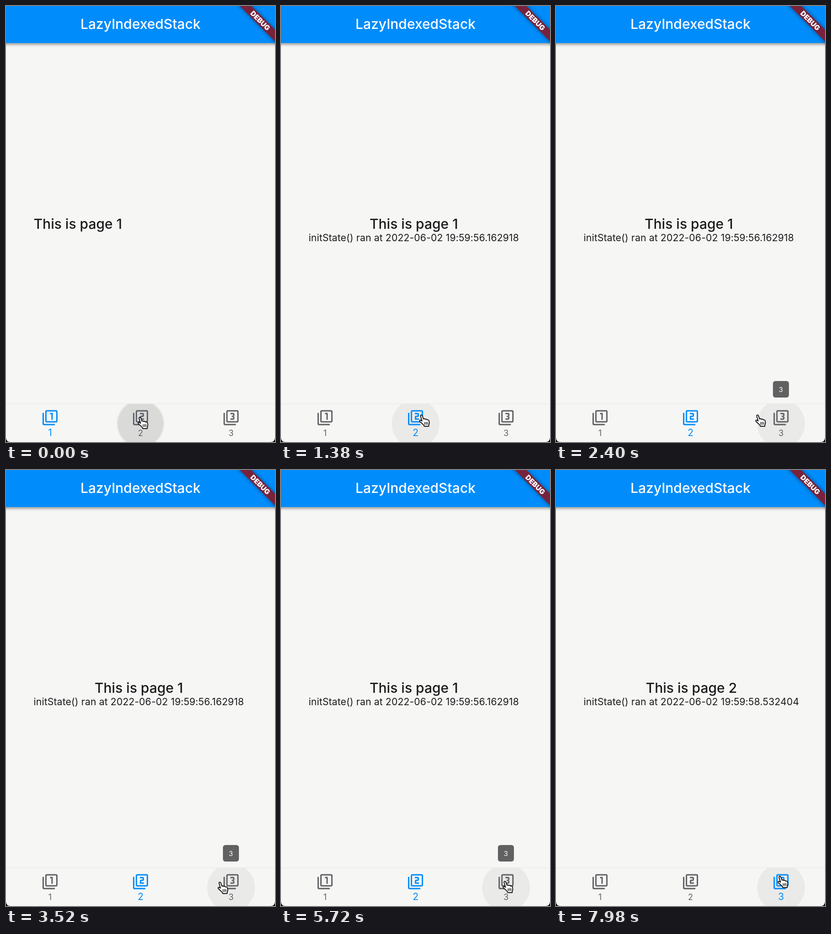
An HTML page for the animation above (8000 ms loop, 589 px wide and 951 px high).

```html
<!DOCTYPE html>
<html lang="en">
<head>
<meta charset="utf-8">
<title>LazyIndexedStack</title>
<style>
  html, body { margin: 0; width: 100%; height: 100%; overflow: hidden; background: #000; }
  body { position: relative; font-family: Inter, sans-serif; }
  svg { position: absolute; left: 0; top: 0; }
  #page { position: absolute; left: 60.5px; top: 457px; text-align: center; color: #1b1b1b; white-space: nowrap; }
  #heading { font-size: 30px; font-weight: 550; line-height: 36px; }
  #detail { font-size: 21.2px; letter-spacing: .13px; line-height: 25px; }
</style>
</head>
<body>
<svg width="589" height="951" viewBox="0 0 589 951">
  <defs>
    <clipPath id="navClip"><path d="M0 868H589V941Q589 951 579 951H10Q0 951 0 941Z"/></clipPath>
    <filter id="barShadow" x="-5%" y="-20%" width="110%" height="150%">
      <feDropShadow dx="0" dy="3" stdDeviation="3" flood-opacity=".42"/>
    </filter>
    <filter id="ribbonShadow" x="-20%" y="-120%" width="140%" height="340%">
      <feDropShadow dx="0" dy="0" stdDeviation="4.5" flood-opacity=".5"/>
    </filter>
  </defs>
  <path d="M0 0H589V941Q589 951 579 951H10Q0 951 0 941Z" fill="#f6f6f5"/>
  <rect x="-10" y="-10" width="609" height="90.7" fill="#028cfa" filter="url(#barShadow)"/>
  <text x="294.5" y="49.5" font-size="30" font-weight="520" fill="#fff" text-anchor="middle">LazyIndexedStack</text>
  <g transform="translate(556.7 32) rotate(45)">
    <rect x="-90" y="-9" width="180" height="18" fill="#78233a" filter="url(#ribbonShadow)"/>
    <text y="5.5" font-size="15.3" font-weight="900" fill="#fff" text-anchor="middle">DEBUG</text>
  </g>
  <path d="M0 867.5H589" stroke="#ebebeb" stroke-width="1.5"/>
  <g id="ink" clip-path="url(#navClip)"></g>
  <g id="tabs"></g>
  <g id="tooltip">
    <rect x="475" y="818" width="35" height="36" rx="5.5" fill="#616161"/>
    <text x="492.3" y="841.5" font-size="15" fill="#fff" text-anchor="middle">3</text>
  </g>
</svg>
<div id="page"><div id="heading"></div><div id="detail"></div></div>
<svg width="589" height="951" viewBox="0 0 589 951">
  <g id="cursor" stroke="#111" stroke-linejoin="round" stroke-linecap="round">
    <path fill="#fff" stroke-width="1.9" d="M3.5 3.5C3 1 6 .2 7.2 2.5L9.7 9.7C11 8.5 13 8.9 13.6 10.6C15 9.6 17 10 17.6 11.6C19.5 10.8 21.5 12 22.1 14.2C23 18 22.8 19.5 21.6 22L21.2 25.7H11.5L10.6 23.5C8 20.5 5 18 2 15.5C.2 13.4 2 11.5 4.2 12.6L6.6 14.2Z"/>
    <path fill="none" stroke-width="1.4" d="M12 17l.7 5M15.1 16.7l.6 5M18.1 16.5l.5 5"/>
  </g>
</svg>
<script>
const LOOP = 8000;
const TAPS = [-60, 6600];      // selecting tab 2, then tab 3
const FADE = 560;              // tab colour change and ripple fade
const DETAIL_DELAY = 580;      // subtitle appears after the page does
const HOVER_SWITCH = 1980;     // pointer crosses from tab 2 to tab 3
const PRESS = 6250;
const GRAY = [97, 97, 100], BLUE = [2, 140, 250];
const PAGES = [
  ['This is page 1', 'initState() ran at 2022-06-02 19:59:56.162918'],
  ['This is page 2', 'initState() ran at 2022-06-02 19:59:58.532404']
];
const CURSOR = [[0, 288, 896], [600, 288, 896], [1380, 302, 891], [2400, 436, 891],
  [3520, 463, 898], [4700, 485, 896], [7200, 485, 896], [7980, 485, 885]];
const FRAME = 'M3 5H1v16c0 1.1.9 2 2 2h16v-2H3zM21 1H7c-1.1 0-2 .9-2 2v14c0 1.1.9 2 2 2h14c1.1 0 2-.9 2-2V3c0-1.1-.9-2-2-2zm0 16H7V3h14z';
const DIGITS = [
  'M14 15h2V5h-4v2h2z',
  'M17 13h-4v-2h2c1.1 0 2-.89 2-2V7c0-1.11-.9-2-2-2h-4v2h4v2h-2c-1.1 0-2 .89-2 2v4h6z',
  'M17 13v-1.5c0-.83-.67-1.5-1.5-1.5.83 0 1.5-.67 1.5-1.5V7c0-1.11-.9-2-2-2h-4v2h4v2h-2v2h2v2h-4v2h4c1.1 0 2-.89 2-2z'
];

const $ = id => document.getElementById(id);
const clamp = x => Math.min(1, Math.max(0, x));
const ramp = (t, start, length) => clamp((t - start) / length);
const ease = x => x * x * (3 - 2 * x);
const mix = (a, b, k) => a + (b - a) * k;
const tabX = i => 96.4 + 198.2 * i;

function add(parent, tag, attrs) {
  const node = document.createElementNS('http://www.w3.org/2000/svg', tag);
  for (const name in attrs) node.setAttribute(name, attrs[name]);
  return parent.appendChild(node);
}

const tabs = DIGITS.map((digit, i) => {
  const group = add($('tabs'), 'g', { transform: `translate(${tabX(i)} 0)` });
  add(group, 'path', { d: FRAME + digit, 'fill-rule': 'evenodd', transform: 'translate(-18 880) scale(1.5)' });
  const label = add(group, 'text', { y: 938.3, 'text-anchor': 'middle' });
  label.textContent = i + 1;
  return { group, label };
});
const circle = i => add($('ink'), 'circle', { cx: tabX(i), cy: 911, r: 52.3, opacity: 0 });
const hovers = [1, 2].map(circle);
const splashes = [1, 2].map(circle);

function setTab(i, amount) {
  const rgb = GRAY.map((c, n) => Math.round(mix(c, BLUE[n], amount)));
  tabs[i].group.setAttribute('fill', `rgb(${rgb})`);
  tabs[i].label.setAttribute('font-size', mix(18, 21, amount));
}

function cursorAt(t) {
  const next = CURSOR.findIndex(key => key[0] > t);
  if (next < 0) return CURSOR[CURSOR.length - 1].slice(1);
  const [a, b] = [CURSOR[next - 1], CURSOR[next]];
  const k = ramp(t, a[0], b[0] - a[0]);
  return [mix(a[1], b[1], k), mix(a[2], b[2], k)];
}

function render(t) {
  const [first, second] = TAPS.map(tap => ease(ramp(t, tap, FADE)));
  setTab(0, 1 - first);
  setTab(1, first - second);
  setTab(2, second);

  const index = t < TAPS[1] ? 0 : 1;
  const [heading, detail] = PAGES[index];
  $('heading').textContent = heading;
  $('detail').textContent = t - TAPS[index] >= DETAIL_DELAY ? detail : '';

  const moved = ramp(t, HOVER_SWITCH, 140);
  hovers[0].setAttribute('opacity', .05 * (1 - moved));
  hovers[1].setAttribute('opacity', .05 * moved);

  const pressed = ramp(t, PRESS, 200);
  splashes[0].setAttribute('opacity', .08 * (1 - ramp(t, TAPS[0], FADE)));
  splashes[0].setAttribute('r', mix(50, 52.3, ramp(t, 0, 200)));
  splashes[1].setAttribute('opacity', .08 * pressed * (1 - ramp(t, TAPS[1], FADE)));
  splashes[1].setAttribute('r', mix(20, 52.3, ramp(t, PRESS, 450)));

  $('tooltip').setAttribute('opacity', ramp(t, HOVER_SWITCH, 300) * (1 - ramp(t, PRESS, 200)));
  $('cursor').setAttribute('transform', `translate(${cursorAt(t)})`);
}

const start = performance.now();
function tick() {
  render((performance.now() - start) % LOOP);
  requestAnimationFrame(tick);
}
tick();
</script>
</body>
</html>
```
